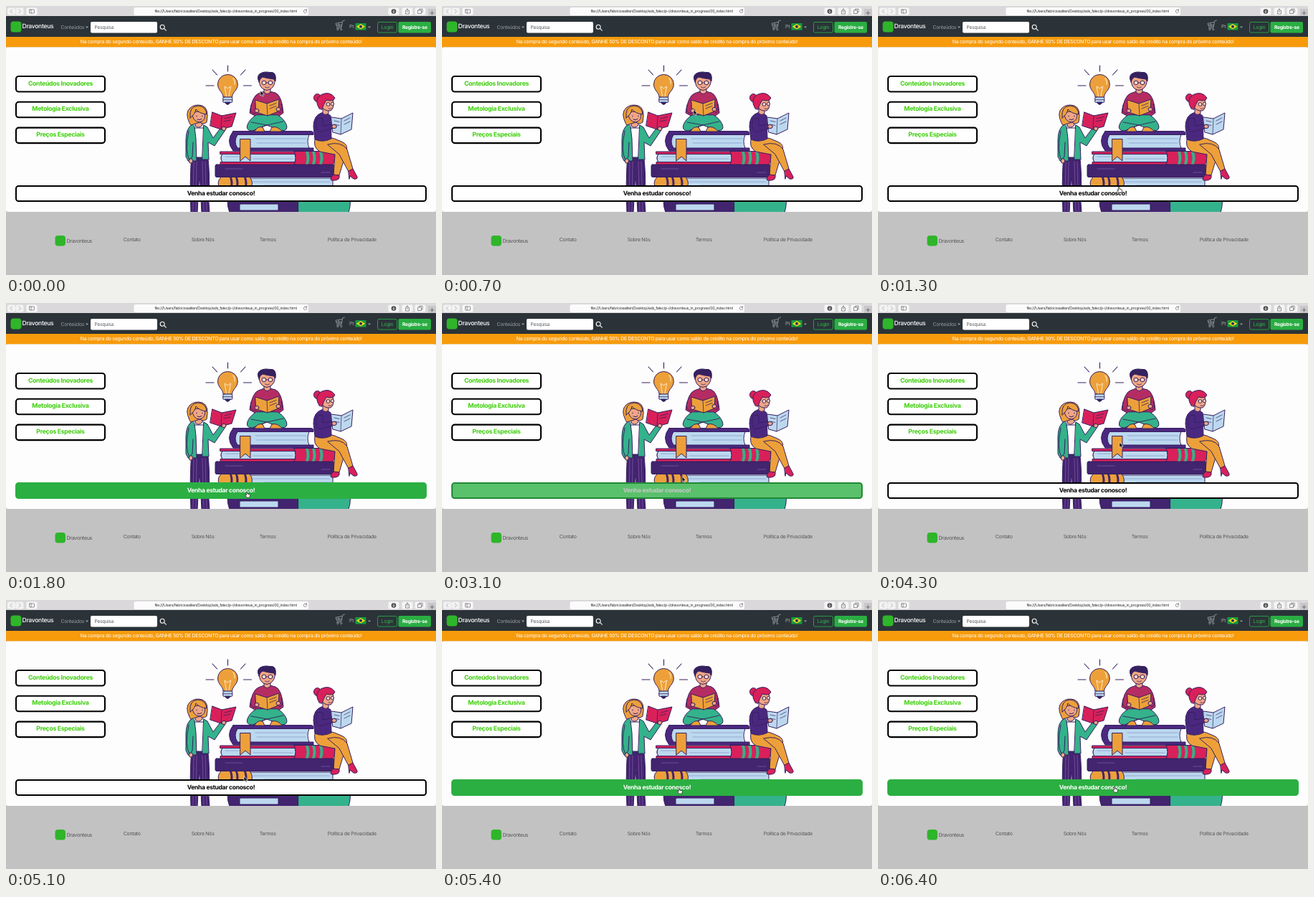
Write an HTML page with a canvas that moves like this. It is 600 px wide and 375 px high and loops after 6.6 s.

```html
<!DOCTYPE html>
<html lang="pt">
<head>
<meta charset="utf-8">
<title>Dravonteus</title>
<style>
html, body { margin: 0; width: 100%; height: 100%; overflow: hidden; background: #c3c2c3; }
#stage { position: absolute; left: 0; top: 0; width: 600px; height: 375px; overflow: hidden;
  font-family: Inter, Roboto, sans-serif; letter-spacing: -.02em; text-rendering: geometricPrecision; }
canvas { position: absolute; left: 0; top: 0; width: 600px; height: 375px; }
span { position: absolute; line-height: 10px; white-space: nowrap; }
.mid { width: 500px; text-align: center; }
#cta { position: absolute; left: 13px; top: 250px; width: 574px; height: 23px; box-sizing: border-box;
  border: 2px solid; border-radius: 4.5px; text-align: center; font-weight: 700; font-size: 8.55px; line-height: 20.6px; }
</style>
</head>
<body>
<div id="stage">
  <canvas id="scene"></canvas>
  <div id="cta">Venha estudar conosco!</div>
  <canvas id="top"></canvas>
</div>
<script>
const stage = document.getElementById('stage');
const cta = document.getElementById('cta');
const LOOP = 6600, GREEN = [43, 175, 66];

function context(id) {
  const el = document.getElementById(id), k = window.devicePixelRatio || 1;
  el.width = 600 * k;
  el.height = 375 * k;
  const c = el.getContext('2d');
  c.scale(k, k);
  c.lineJoin = c.lineCap = 'round';
  return c;
}
const g = context('scene'), pointer = context('top');

const INK = '#35215f', SKIN = '#f0a685', PURPLE = '#4b2880', DARK = '#42246f', TEAL = '#34b28b',
  PINK = '#d9205a', WINE = '#b52c63', ORANGE = '#eda03a', BLUE = '#bcd8ef', WHITE = '#fdfcfe';

function shape(d, fill, line = INK, w = 1, c = g) {
  const p = new Path2D(d);
  if (fill) { c.fillStyle = fill; c.fill(p); }
  if (line) { c.strokeStyle = line; c.lineWidth = w; c.stroke(p); }
}
function box(x, y, w, h, fill, r = 0, line = null, lw = 1) {
  g.beginPath();
  g.roundRect(x, y, w, h, r);
  if (fill) { g.fillStyle = fill; g.fill(); }
  if (line) { g.strokeStyle = line; g.lineWidth = lw; g.stroke(); }
}
function disc(x, y, rx, ry, fill, line = INK) {
  g.beginPath();
  g.ellipse(x, y, rx, ry, 0, 0, 7);
  if (fill) { g.fillStyle = fill; g.fill(); }
  if (line) { g.strokeStyle = line; g.lineWidth = 1; g.stroke(); }
}
function label(text, x, y, size, color, weight = 400, mid = false) {
  const s = document.createElement('span');
  s.textContent = text;
  if (mid) s.className = 'mid';
  s.style.cssText = `left:${mid ? x - 250 : x}px;top:${y - 5}px;font-size:${size}px;color:${color};font-weight:${weight}`;
  stage.insertBefore(s, cta);
}

function browserBar() {
  box(0, 0, 600, 14, '#dad8da');
  box(2, 2.5, 11, 10, '#f3f2f3', 2);
  box(13.5, 2.5, 11, 10, '#f3f2f3', 2);
  shape('M8.5 5L6 7.5L8.5 10M18 5L20.5 7.5L18 10', null, '#aaa', .9);
  box(28.5, 2.5, 15, 10, '#f8f8f8', 2);
  box(32.5, 5, 7, 5, null, .5, '#666', .7);
  shape('M35 5V10', null, '#666', .7);
  box(178.5, 2, 243.5, 11, '#fbfbfb', 2.5);
  label('file:///Users/fabriciosaliteri/Desktop/ads_fatec/p-i/dravonteus_in_progress/00_index.html',
    306.5, 7.6, 5.4, '#333', 400, true);
  shape('M419 5.7A2.2 2.2 0 1 0 419.7 7.6M419.5 4.5V6.1H417.9', null, '#666', .7);
  // downloads, share, tabs, new tab
  for (const x of [533.5, 552.5, 570.5]) box(x, 2.5, 15, 10, '#f6f5f6', 2);
  disc(541, 7.5, 3.3, 3.3, '#4a4a4a', null);
  shape('M541 5.6V9M539.6 7.8L541 9.2L542.4 7.8', null, '#fff', .7);
  shape('M558.5 6.5H557.5V11H562.5V6.5H561.5M560 8.5V4M558.7 5.2L560 4L561.3 5.2', null, '#666', .7);
  shape('M575 5.8H579.5V10.5H575ZM576.7 5.8V4.2H581.2V8.8H579.5', null, '#666', .7);
  box(589, 4, 11, 10, '#c9c7c9');
  shape('M592 9.8H597M594.5 7.3V12.3', null, '#555', .7);
}

function navBar() {
  box(0, 14, 600, 29, '#2b3338');
  box(6.5, 21.5, 15, 15, '#2fb52a', 4);
  label('Dravonteus', 22.5, 29.2, 8.6, '#fff', 500);
  label('Conteúdos', 76.5, 29.7, 6.9, '#969c9f');
  shape('M111 28.6H115L113 30.9Z', '#969c9f', null);
  box(118, 22, 93, 15.5, '#fff', 2);
  label('Pesquisa', 123.5, 29.7, 6.8, '#5c6369');
  shape('M221.2 29.2a3 3 0 1 1 -6 0a3 3 0 1 1 6 0M220.5 31.4L223.3 34.1', null, '#fff', 1.1);
  shape('M472.5 20L469.8 20.8L467.8 30.5H461.5M469.4 22.5L460 24.3L461.7 28.8L468.1 28.3M461 26.4H468.8M463.8 23.7L464.8 28.5', null, '#898f93', 1);
  disc(462.8, 32.6, 1.1, 1.1, null, '#898f93');
  disc(467.7, 32.6, 1.1, 1.1, null, '#898f93');
  label('Pt', 479, 29.2, 7, '#a4a9ac');
  box(487.5, 24, 15, 9.5, '#169b3f');
  shape('M488.8 28.8L495 25L501.2 28.8L495 32.5Z', '#f5d51e', null);
  disc(495, 28.8, 2, 2, '#22306f', null);
  shape('M505 28.4H509L507 30.7Z', '#969c9f', null);
  box(518.5, 22.5, 27, 14.5, null, 2, '#27a745', .9);
  label('Login', 532, 29.7, 6.9, '#2fba4d', 400, true);
  box(547.5, 22, 45.5, 15.5, '#2aae43', 2);
  label('Registre-se', 570.3, 29.7, 6.75, '#fff', 700, true);
  box(0, 43, 600, 14.5, '#f79b0c');
  label('Na compra do segundo conteúdo, GANHE 50% DE DESCONTO para usar como saldo de crédito na compra do próximo conteúdo!',
    300, 49.5, 7, '#fff', 400, true);
}

function bulb() {
  shape('M309.5 83V91M288 89L294.5 96M334 89L327.5 96M279 111H290M331.5 111H342.5', null, INK, 1.1);
  shape('M303 127C303 120 295.5 118 295.5 109A13.9 13.5 0 0 1 323.3 109C323.3 118 315.5 120 315.5 127Z', ORANGE);
  shape('M307.5 126L305 112L309.2 115L313.5 112L311 126', null, '#fff2d5', .9);
  shape('M317 101Q319.5 104 319 109', null, '#ffe0a1', 1.3);
  box(302.8, 127, 13, 7.5, BLUE, 1.5, INK);
  shape('M303 130.7H315.5', null, INK, .8);
  shape('M305.5 134.5Q309.3 140.5 313 134.5Z', INK);
}

function books() {
  // bottom volume, mostly behind the button
  shape('M312 256H408V288H312Q306 272 312 256Z', DARK);
  box(326, 276, 54, 9, BLUE, 1, INK);
  shape('M408 256H478Q483 272 478 288H408Z', TEAL);
  // orange spine with pale pages
  shape('M338 240H456V255H338Z', BLUE);
  shape('M345 245H452M360 250H454', null, '#8192c4', .7);
  shape('M300 238.5H340Q347 247 340 256H300Q292 247 300 238.5Z', ORANGE);
  for (const x of [312, 320, 332]) shape(`M${x} 239H${x + 3}Q${x + 6} 247 ${x + 3} 255.5H${x}Q${x + 3} 247 ${x} 239Z`, DARK, null);
  // dark volume
  box(292, 221, 166, 17.5, DARK, 2, INK);
  shape('M306 227H330M440 232H452', null, '#7756a6', .8);
  // crimson volume
  shape('M299 203H404V221H299V217.5H302Q298 212 302 206.5H299Z', PINK);
  shape('M302 206.5H403Q406 212 403 217.5H302Q298 212 302 206.5Z', BLUE);
  shape('M306 210H325M345 213H400', null, '#8192c4', .7);
  shape('M402 202.5H456Q462 212 456 221H402Q406 212 402 202.5Z', PINK);
  for (const x of [418, 427, 437]) shape(`M${x} 203H${x + 4}Q${x + 7} 212 ${x + 4} 220.5H${x}Q${x + 3} 212 ${x} 203Z`, TEAL, null);
  // top volume
  shape('M317 174.5H425Q429 174.5 429 177.5V179.5H323Q317 189 323 198H429V202H317Q306 188 317 174.5Z', PURPLE);
  shape('M323 179.5H423Q419 189 423 198H323Q317 189 323 179.5Z', BLUE);
  shape('M348 185H419M350 191H418', null, '#8192c4', .7);
  shape('M327 185.5H341V216L334 210L327 216Z', ORANGE);
}

function boy() {
  shape('M352 122Q343 126 340 149L349 154H380L387 149Q385 125 376 121L364 118Z', WINE);
  shape('M360 114V120Q364 125 369 120V114Z', SKIN);
  shape('M353.5 102V107Q355 116 364 117.5Q373 116 375 107V102Q372 96 356 98Z', SKIN);
  shape('M353 106Q349 97 355 94Q360 91 368 92.5Q378 91 376 105L373.5 102Q365 101 358 99Q354 101 353 106Z', INK);
  disc(360, 107, 3, 2.8, '#ffd9c6');
  disc(369, 107, 3, 2.8, '#ffd9c6');
  shape('M363 107H366M361.5 113Q364.5 115.5 367.5 113', null, INK, .8);
  // crossed legs
  shape('M349 152Q339 158 336.5 167Q335 174 344 174L364 166L384 174Q394 174 391.5 166Q388 157 379 152Z', TEAL);
  shape('M342 162L364 166L387 161M364 166Q353 169 345 174', null, INK, .9);
  shape('M347 174.5Q351 167 358 169L361 175H347Z', ORANGE);
  shape('M385 174.5Q379 167 371 169L368 175H385Z', ORANGE);
  // open book
  shape('M348 131L364 136L381 130L380 147L365 153L349 148Z', ORANGE);
  shape('M364 136L365 153M368 139L377 135.5M368 143L377 139.5', null, INK, .8);
  shape('M342 138Q338 150 349 150M384 137Q388 149 381 149', null, INK, .9);
  disc(350, 146, 3, 2.6, SKIN);
  disc(380, 144, 3, 2.6, SKIN);
}

function reader() {
  // legs and heels
  shape('M432 182Q450 180 468 189Q478 193 475 202L465 236H457L459 207L438 203Q427 197 432 182Z', ORANGE);
  shape('M449 193Q468 188 476 200L484 227L478 231L465 207Z', ORANGE);
  shape('M457 235L465 236V239Q464 244 454 243Q451 241 457 235Z', PINK);
  shape('M478 230L484 227L490 238Q491 242 485 241L480 237L479 241Z', PINK);
  shape('M440 149Q429 153 429 168L431 186Q442 191 454 185L453 153L446 148Z', PURPLE);
  shape('M442 143V150Q446 153 450 150V144Z', SKIN);
  disc(434.5, 128, 5, 5.5, PINK);
  shape('M440 131L456 130Q459 142 453 146Q444 147 440 140Z', SKIN);
  shape('M437 143Q429 130 440 123.5Q452 118 459 128Q457 134 447 131Q443 137 441 144Z', PINK);
  disc(449.5, 137, 2.5, 2.4, '#ffd9c6');
  disc(455.5, 136.5, 2, 2.3, '#ffd9c6');
  shape('M450 143Q452.5 144.5 455 142.5', null, INK, .8);
  shape('M454 155L468 157L484 149L482 172L467 179L456 176Z', BLUE);
  shape('M468 157L467 179M472 160L480 156M472 165L480 161M458 160L465 161.5M458 165L465 166.5', null, INK, .7);
  shape('M434 157Q430 171 437 176L456 171L455 165L442 167L442 157Z', PURPLE);
  disc(458, 168, 3.3, 2.7, SKIN);
}

function walker() {
  shape('M259 206H281Q285 230 283 274L284 288H273L270 232L267 288H258Q256 245 259 206Z', DARK);
  for (const x of [262, 266, 274, 278]) shape(`M${x} 217L${x + (x < 270 ? -1 : 2)} 286`, null, '#8e5ab0', .7);
  shape('M260 170H279L280 211H260Z', WHITE);
  shape('M260 165Q251 170 251 187V210L254 216H266L265 185L263 168Z', TEAL);
  shape('M276 166L281 169L289 184L301 168L306 173L291 195L282 190L283 214H274Z', TEAL);
  shape('M255 174Q249 202 256 215L260 210L261 190', TEAL);
  disc(258, 216, 2.8, 3.2, SKIN);
  shape('M264 159V167Q269 172 274 166V159Z', SKIN);
  shape('M256 163Q249 149 257 142Q264 136 274 139Q284 143 280 162Q275 166 271 162L258 166Z', ORANGE);
  shape('M260 149Q265 146 277 148Q280 160 270 162Q260 161 260 149Z', SKIN);
  shape('M257 156Q255 140 268 139Q279 140 280 151Q270 150 265 144Q264 151 257 156Z', ORANGE);
  shape('M266 153V154M274 153V154M267 158Q270 160 273 157.5', null, INK, 1);
  shape('M288 148L301 153L321 149L315 168L300 172L285 167Z', PINK);
  shape('M301 153L300 172M305 157L315 154.5M304 161L313 159', null, INK, .8);
  disc(304, 171, 3, 2.6, SKIN);
}

function page() {
  box(0, 57.5, 600, 229.5, '#fefdfe', [2, 2, 3, 3]);
  g.save();
  g.beginPath();
  g.rect(0, 57, 600, 230);
  g.clip();
  bulb();
  books();
  boy();
  reader();
  walker();
  g.restore();
  ['Conteúdos Inovadores', 'Metologia Exclusiva', 'Preços Especiais'].forEach((s, i) => {
    const y = 97 + i * 35.8;
    box(14, y + 1, 124, 21.5, '#fff', 3.8, '#000', 2.1);
    label(s, 76, y + 11.5, 8.75, '#3fcf0d', 700, true);
  });
  box(68.5, 320, 14.5, 14.5, '#2fb52a', 4);
  label('Dravonteus', 84.5, 327.7, 7.2, '#565656');
  ['Contato', 'Sobre Nós', 'Termos', 'Política de Privacidade'].forEach((s, i) =>
    label(s, 163.7 + i * 95, 325.6, 7.03, '#565656'));
}

// pointer tip: time, x, y
const PATH = [[0, 355, 118], [500, 355, 118], [800, 349, 158], [1100, 340, 222], [1300, 336, 252],
  [1800, 336, 263], [2300, 336, 263], [2600, 337, 266], [2900, 336, 261], [3100, 335, 242],
  [3400, 338, 212], [3600, 338, 203], [4000, 337, 192], [4200, 337, 192], [4800, 336, 206],
  [5100, 332, 246], [5300, 331, 261], [5700, 330, 265], [6000, 330, 265], [6400, 330, 260], [LOOP, 330, 260]];

function tip(t) {
  let i = 1;
  while (PATH[i][0] < t) i++;
  const [t0, x0, y0] = PATH[i - 1], [t1, x1, y1] = PATH[i], k = (t - t0) / (t1 - t0);
  return [x0 + (x1 - x0) * k, y0 + (y1 - y0) * k];
}
function ramp(t, start) {
  const k = Math.min(1, Math.max(0, (t - start) / 150));
  return k * k * (3 - 2 * k);
}
const mix = (a, b, k) => `rgb(${b.map(v => Math.round(a + (v - a) * k))})`;

function draw(t) {
  const hover = ramp(t, 1300) - ramp(t, 3055) + ramp(t, 5130);
  cta.style.backgroundColor = mix(255, GREEN, hover);
  cta.style.borderColor = mix(0, GREEN, hover);
  cta.style.color = mix(0, [255, 255, 255], hover);

  const [x, y] = tip(t);
  pointer.clearRect(0, 0, 600, 375);
  pointer.save();
  pointer.translate(x, y);
  if (y >= 250) {
    shape('M-.8 .6Q0 -.5 .8 .6V3L4 3.8Q5 4.2 4.6 6L3.8 8.2H.2L-2.4 5Q-2.5 3.8 -.8 4.7Z', '#fff', '#222', .8, pointer);
  } else {
    shape('M0 0V7.2L1.7 5.7L2.9 8.3L4.1 7.8L3 5.2H5.2Z', '#111', '#fff', .6, pointer);
  }
  pointer.restore();
}

browserBar();
navBar();
page();

const start = performance.now();
function tick(now) {
  const t = Math.max(0, now - start) % LOOP;
  draw(Math.floor(t / 100) * 100);
  requestAnimationFrame(tick);
}
draw(0);
requestAnimationFrame(tick);
</script>
</body>
</html>
```
